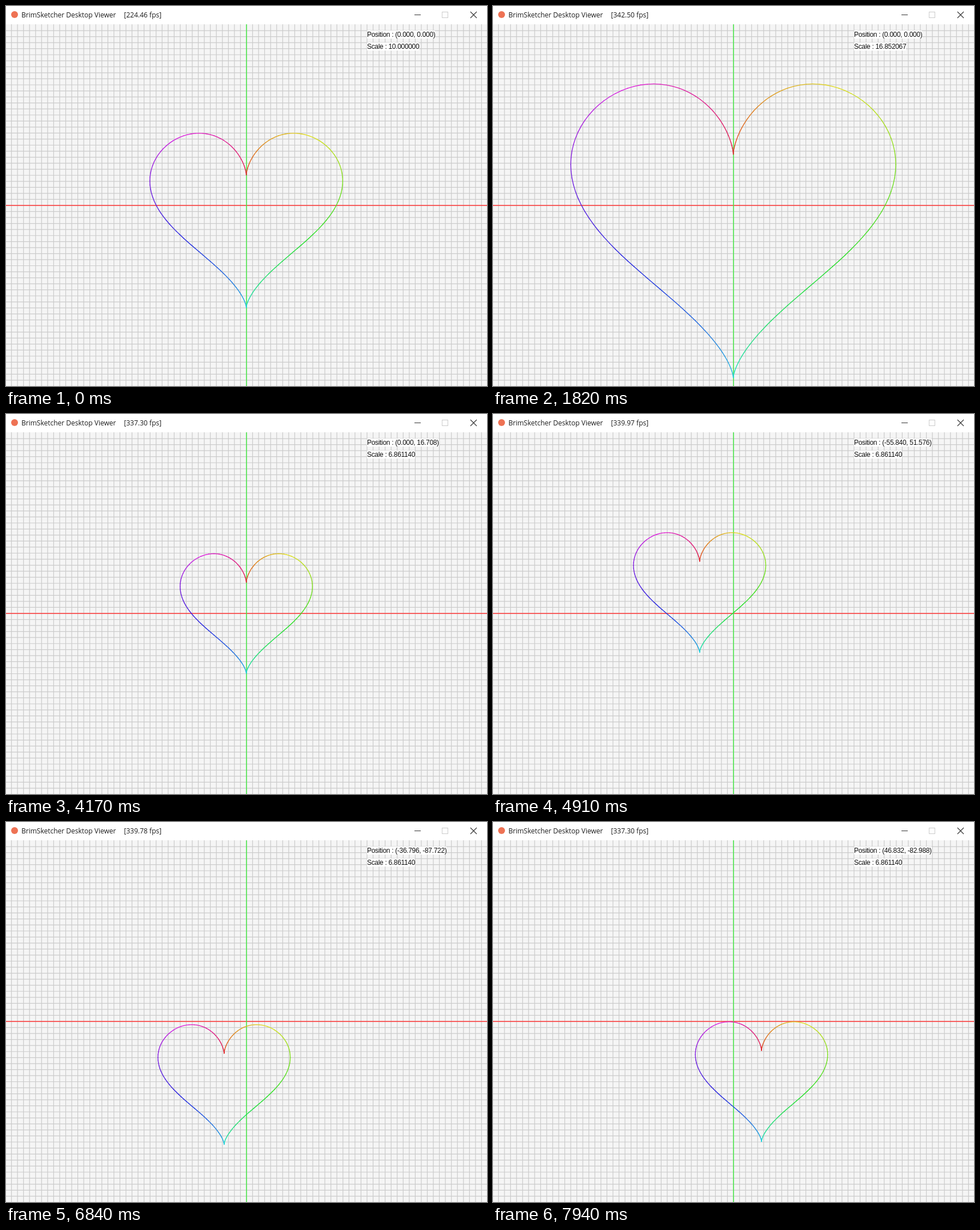
Animation, 842 px wide and 665 px high, one loop 8 s. Source, as an HTML page with a canvas:

```html
<!DOCTYPE html>
<html lang="en">
<head>
<meta charset="utf-8">
<title>Heart curve</title>
<style>
  html, body { margin: 0; width: 100%; height: 100%; overflow: hidden; background: #fff; }
  canvas { position: absolute; left: 0; top: 0; }
  span { position: absolute; white-space: pre; }
  .title { top: 6px; font: 12px/20px "Open Sans", sans-serif; color: #1c1c1c; }
  .info {
    left: 632px; font: 12px/14px "Liberation Sans", Arial, sans-serif;
    letter-spacing: -0.32px; color: #111; background: #fff;
  }
</style>
</head>
<body>
<canvas id="stage" width="842" height="665"></canvas>
<span class="title" style="left:27px">BrimSketcher Desktop Viewer</span>
<span class="title" style="left:206.5px" id="fps"></span>
<span class="info" style="top:43px" id="position"></span>
<span class="info" style="top:64px" id="scale"></span>
<script>
const W = 842, H = 665, TOP = 32, LOOP = 8000;
const UNIT = 1.055;                         // screen pixels per world unit
const AXIS_X = 421, AXIS_Y = 349;
const TICK = 68.7, TICK_ORIGIN = 4005;      // picture refresh; 15 refreshes make one world second

// Zoom keys held down, in world seconds.
const ZOOM_SPEED = 20, MIN_SCALE = 5, MAX_SCALE = 20;
const ZOOMS = [
  { start: -3.44, hold: 0.25, direction: -1 },
  { start: -2.947, hold: 0.675, direction: 1 },
  { start: -2.21573, hold: 0.581943, direction: -1 }
];

// The arrow keys steer from straight up, turning left by 45 degrees after each hold.
const MOVE_SPEED = 100, MOVE_START = -0.033747;
const HEADING_HOLDS = [0.219156, 0.419462, 0.31829, 0.53758, 0.3858, 1.2466, 0.2801, 0.42677];

const $ = id => document.getElementById(id);
const ctx = $("stage").getContext("2d");
const clamp = (v, low, high) => Math.min(high, Math.max(low, v));

function scaleAt(t) {
  return ZOOMS.reduce((scale, { start, hold, direction }) =>
    clamp(scale + direction * ZOOM_SPEED * clamp(t - start, 0, hold), MIN_SCALE, MAX_SCALE), 10);
}

function positionAt(t) {
  let x = 0, y = 0, left = t - MOVE_START;
  HEADING_HOLDS.forEach((hold, i) => {
    const heading = Math.PI / 2 + i * Math.PI / 4;
    const distance = MOVE_SPEED * clamp(left, 0, hold);
    x += distance * Math.cos(heading);
    y += distance * Math.sin(heading);
    left -= hold;
  });
  return [x, y];
}

// A slow start, then a small swing; refreshed about twice a second.
function fpsAt(ms) {
  const i = Math.floor((ms + 250) / 505);
  return i === 0 ? 224.46 : 339.9 + 2.6 * Math.cos(0.79 * (i - 4));
}

function line(x1, y1, x2, y2, color, width) {
  ctx.strokeStyle = color;
  ctx.lineWidth = width;
  ctx.beginPath();
  ctx.moveTo(x1, y1);
  ctx.lineTo(x2, y2);
  ctx.stroke();
}

function drawWindow() {
  ctx.fillStyle = "#fff";
  ctx.fillRect(0, 0, W, TOP);
  ctx.fillStyle = "#ee7254";
  ctx.beginPath();
  ctx.arc(15, 15, 6, 0, 2 * Math.PI);
  ctx.fill();

  line(715, 15.5, 726, 15.5, "#333", 1);
  ctx.strokeStyle = "#ccc";
  ctx.strokeRect(763.5, 10.5, 10, 10);
  line(813, 10, 824, 21, "#333", 1.1);
  line(824, 10, 813, 21, "#333", 1.1);
}

function drawGrid() {
  ctx.fillStyle = "#f5f5f5";
  ctx.fillRect(0, TOP, W, H - TOP);
  for (let i = -40; i <= 40; i++) {
    const x = AXIS_X + i * 10 * UNIT, y = AXIS_Y + i * 10 * UNIT;
    line(x, TOP, x, H, "#cbcbcb", 1.2);
    if (y > TOP + 1) line(0, y, W, y, "#cbcbcb", 1.2);
  }
  line(0, AXIS_Y, W, AXIS_Y, "#ff3434", 1.5);
  line(AXIS_X, TOP, AXIS_X, H, "#46ea46", 1.5);
}

function heartPoint(deg, scale, px, py) {
  const a = deg * Math.PI / 180;
  const x = 16 * Math.sin(a) ** 3;
  const y = 13 * Math.cos(a) - 5 * Math.cos(2 * a) - 2 * Math.cos(3 * a) - Math.cos(4 * a);
  return [AXIS_X - 0.4 + (x * scale + px) * UNIT, AXIS_Y - 0.6 - (y * scale + py) * UNIT];
}

function drawHeart(scale, px, py) {
  ctx.lineCap = "round";
  for (let deg = 0; deg < 360; deg += 2) {
    line(...heartPoint(deg, scale, px, py), ...heartPoint(deg + 2, scale, px, py),
      `hsl(${deg + 1}, 75%, 50%)`, 1.35);
  }
  ctx.lineCap = "butt";
}

function render() {
  const ms = performance.now() % LOOP;
  const seconds = Math.floor((ms - TICK_ORIGIN) / TICK) / 15;
  const scale = scaleAt(seconds);
  const [px, py] = positionAt(seconds);

  drawGrid();
  drawHeart(scale, px, py);
  drawWindow();

  // Adding zero after rounding keeps "-0.000" away.
  const coordinate = v => (Math.round(v * 1000) / 1000 + 0).toFixed(3);
  $("fps").textContent = `[${fpsAt(ms).toFixed(2)} fps]`;
  $("position").textContent = `Position : (${coordinate(px)}, ${coordinate(py)})`;
  $("scale").textContent = `Scale : ${scale.toFixed(6)}`;
  requestAnimationFrame(render);
}
render();
</script>
</body>
</html>
```
